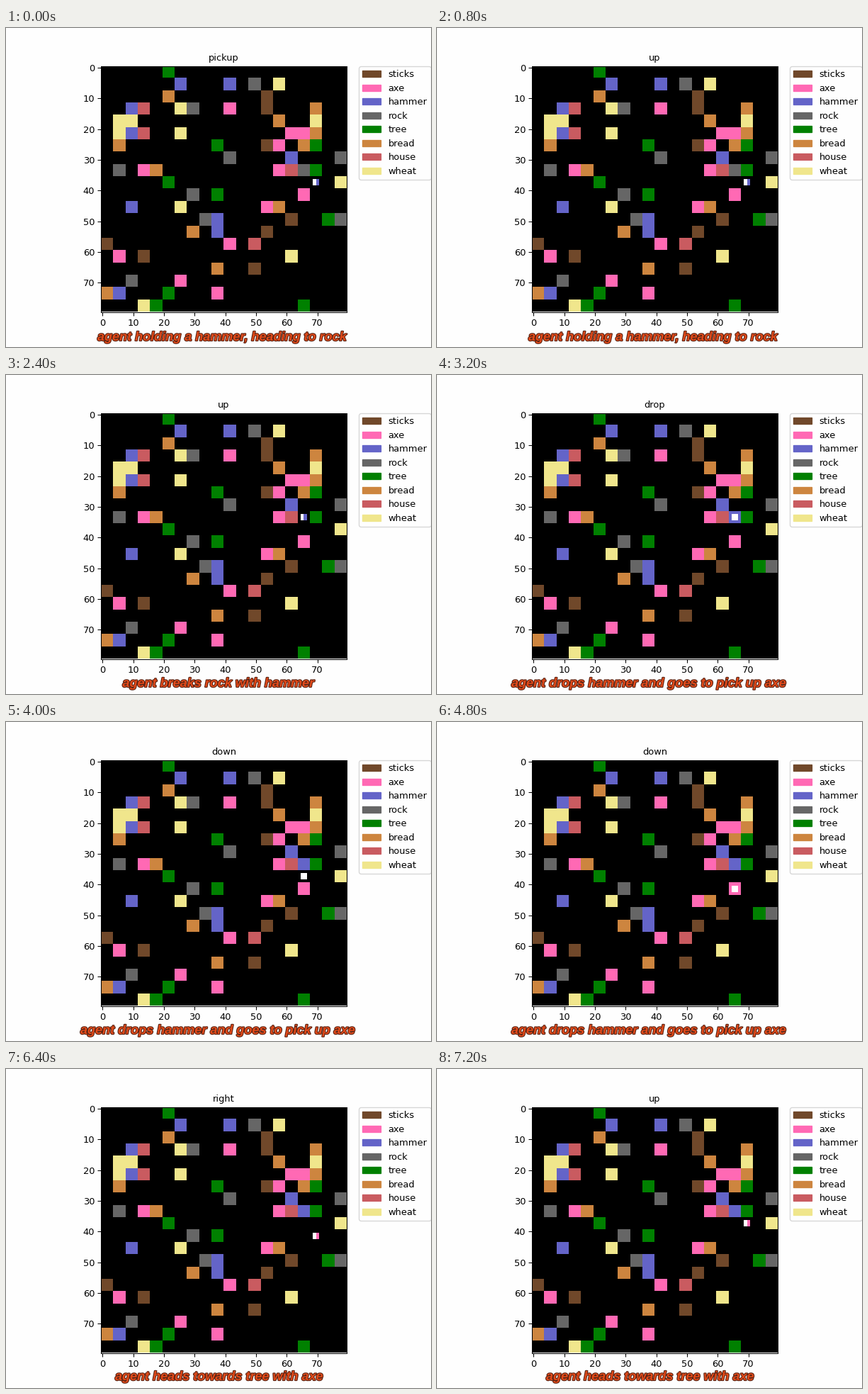
A matplotlib script that plays this animation: 600 px wide and 450 px high, repeating every 8 s.

```python
import matplotlib.pyplot as plt
import matplotlib.patheffects as pe
import numpy as np
from matplotlib.animation import FuncAnimation
from matplotlib.colors import to_rgb
from matplotlib.patches import Patch

WIDTH, HEIGHT, DPI = 600, 450, 93.75
SIZE, CELL = 20, 4  # cells per side, image pixels per cell
START = (9, 17)

COLORS = {
    "sticks": "#70482a", "axe": "#ff69b4", "hammer": "#6464c8",
    "rock": "#666666", "tree": "#008000", "bread": "#cd853f",
    "house": "#c95b60", "wheat": "#f0e68c",
}

# Each cell is row * SIZE + column
CELLS = {
    "sticks": [53, 73, 133, 255, 273, 280, 303, 332],
    "axe": [70, 115, 116, 134, 163, 174, 216, 233, 290, 301, 346, 369],
    "hammer": [26, 30, 62, 102, 155, 197, 222, 249, 269, 361],
    "rock": [32, 67, 150, 159, 161, 176, 207, 248, 259, 342],
    "tree": [5, 129, 137, 177, 185, 209, 258, 365, 384, 396],
    "bread": [45, 77, 94, 117, 121, 136, 164, 234, 267, 329, 360],
    "house": [63, 103, 175, 292],
    "wheat": [34, 66, 81, 82, 97, 101, 106, 199, 226, 315, 383],
}

MOVES = {"up": (-1, 0), "down": (1, 0), "left": (0, -1), "right": (0, 1)}
BREAKS = {"rock": "hammer", "tree": "axe"}
ACTIONS = ["pickup", "up", "left", "up", "drop",
           "down", "down", "pickup", "right", "up"]

# First step, text, centre x and baseline y in pixels
CAPTIONS = [
    (0, "agent holding a hammer, heading to rock", 304.5, 441),
    (3, "agent breaks rock with hammer", 299.5, 440),
    (4, "agent drops hammer and goes to pick up axe", 298.5, 440),
    (8, "agent heads towards tree with axe", 300.5, 439),
]


def play(count):
    """World, agent position and held item after the first `count` actions."""
    world = {divmod(i, SIZE): kind for kind, ids in CELLS.items() for i in ids}
    pos, held = START, None
    for action in ACTIONS[:count]:
        if action == "pickup":
            held = world.pop(pos)
        elif action == "drop":
            world[pos], held = held, None
        else:
            dr, dc = MOVES[action]
            goal = (pos[0] + dr, pos[1] + dc)
            tool = BREAKS.get(world.get(goal))
            if tool and tool != held:
                continue  # blocked
            if tool:
                del world[goal]
            pos = goal
    return world, pos, held


def render(world, pos, held):
    img = np.zeros((SIZE * CELL, SIZE * CELL, 3))
    for (r, c), kind in world.items():
        y, x = r * CELL, c * CELL
        img[y:y + CELL, x:x + CELL] = to_rgb(COLORS[kind])
    y, x = pos[0] * CELL + 1, pos[1] * CELL + 1
    img[y:y + 2, x:x + 2] = 1
    if held:
        img[y:y + 2, x + 1] = to_rgb(COLORS[held])
    return img


fig, ax = plt.subplots(figsize=(WIDTH / DPI, HEIGHT / DPI), dpi=DPI,
                       facecolor="#fefefe")
fig.subplots_adjust(left=0.125, right=0.9, bottom=0.11, top=0.88)
picture = ax.imshow(render(*play(1)), interpolation="nearest")
ax.set_xticks(range(0, 80, 10))
ax.set_yticks(range(0, 80, 10))
title = ax.set_title("", fontsize=10)
ax.legend(handles=[Patch(color=c, label=k) for k, c in COLORS.items()],
          bbox_to_anchor=(1.05, 1), loc="upper left", borderaxespad=0)
caption = fig.text(0.5, 0, "", ha="center", va="baseline",
                   family="Liberation Sans", weight="bold", style="italic",
                   size=13.85, color="#e24a1a")
caption.set_path_effects([pe.Stroke(linewidth=1.7, foreground="#5a2414"),
                          pe.Normal()])


def update(step):
    picture.set_data(render(*play(step + 1)))
    title.set_text(ACTIONS[step])
    _, text, x, y = [c for c in CAPTIONS if c[0] <= step][-1]
    caption.set_text(text)
    caption.set_position((x / WIDTH, 1 - y / HEIGHT))
    return picture, title, caption


anim = FuncAnimation(fig, update, frames=len(ACTIONS), interval=800,
                     repeat=True, repeat_delay=0)
plt.show()
```
